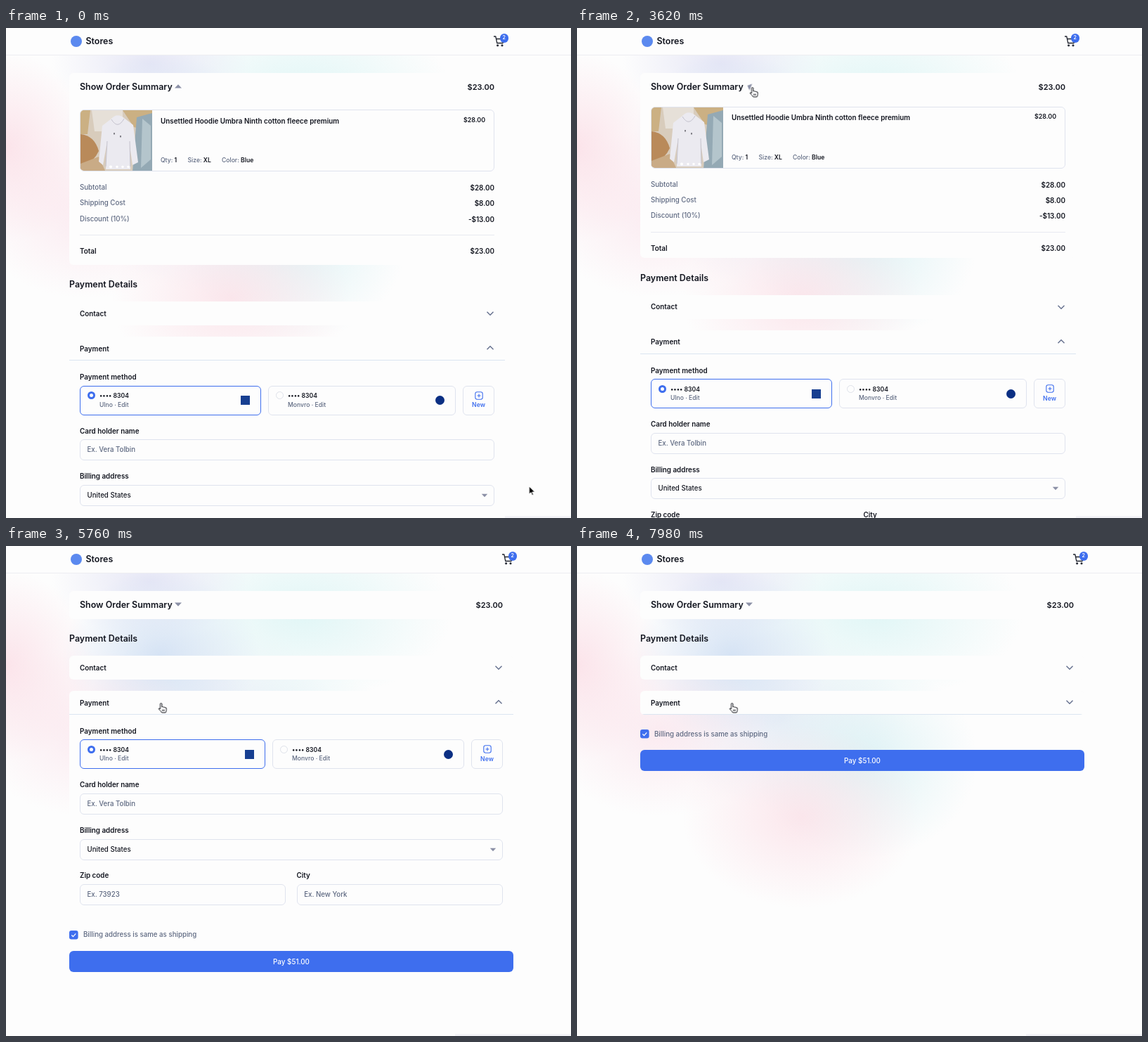
These frames come from a looping animation (804 px wide and 697 px high, 8000 ms). An HTML page:

```html
<!DOCTYPE html>
<html lang="en">
<head>
<meta charset="utf-8">
<title>Checkout</title>
<style>
:root { --paper: #fdfdfd; --ink: #12151f; --mute: #5d6880; --line: #dfe3ee; --blue: #3e6eee; }
* { box-sizing: border-box; }
html, body { margin: 0; width: 100%; height: 100%; overflow: hidden; }
body { position: relative; color: var(--ink); font: 600 9.85px/20px Inter, sans-serif; white-space: nowrap;
  background:
    linear-gradient(#f3f3f7, #f3f3f7) 100% 100% / 165px 3px no-repeat,
    radial-gradient(125px 135px at 0 170px, #fbdee6d0, #fbdee600),
    radial-gradient(160px 120px at 115px 265px, #fae0e9a0, #fae0e900),
    radial-gradient(170px 130px at 320px 385px, #fbe0e7c8, #fbe0e700),
    radial-gradient(140px 120px at 220px 155px, #cfdff3d8, #cfdff300),
    radial-gradient(140px 80px at 205px 50px, #dedff3c0, #dedff300),
    radial-gradient(210px 125px at 425px 95px, #d9f4f4c8, #d9f4f400),
    radial-gradient(160px 140px at 410px 305px, #d7f0f3c8, #d7f0f300),
    radial-gradient(180px 130px at 290px 245px, #dfe6f3b0, #dfe6f300),
    var(--paper); }
.t, .abs, .field, .tile, .mark, svg { position: absolute; }
.t { left: calc(var(--x) * 1px); top: calc(var(--y) * 1px - 10px); }
.t.r { left: auto; right: calc(var(--x) * 1px); }
.h { font-size: 12.45px; }
.s { font-size: 8.65px; }
.m { font-weight: 500; font-size: 9.7px; color: var(--mute); }
.s.m { font-size: 8.6px; }
.m b { color: var(--ink); font-weight: 600; }
.bar { position: absolute; left: 0; right: 0; top: 0; height: 39px; background: var(--paper); border-bottom: 1px solid #ededf1; }
#page { position: absolute; left: 90px; top: 0; width: 620px; padding-top: 64px; }
.card { position: relative; background: var(--paper); border-radius: 6px; overflow: hidden; }
.head { position: relative; height: 34px; }
.fold { overflow: hidden; padding: 12.8px 0; max-height: 400px; }
.inner { position: relative; }
.field, .tile { border: 1px solid var(--line); border-radius: 6px; }
.field { left: 15px; right: 15px; height: 30px; }
.half { right: auto; width: calc(50% - 22.75px); }
.tile { top: 22.7px; height: 42px; }
.dot { position: absolute; left: 10px; top: 7.5px; width: 11px; height: 11px; border: 1px solid #dde0e8; border-radius: 50%; }
.on { border: 3.5px solid var(--blue); }
.mark { width: 13px; height: 13px; }
.turn { width: 12px; height: 12px; }
.rule { position: absolute; left: 15px; right: 15px; height: 1px; background: #e8eaf1; }
svg { overflow: visible; fill: none; }
</style>
</head>
<body>
<div class="bar"></div>
<div id="page">
  <div class="mark" style="left:2px;top:11px;width:16px;height:16px;border-radius:50%;background:#5b89ef"></div>
  <span class="t h" style="--x:23.5;--y:19">Stores</span>
  <svg style="right:0;top:11px" width="16" height="16" stroke="#20242f" stroke-width="1.3" stroke-linejoin="round">
    <path d="M0 1H2.8L4.8 10.5H13L14.5 4.5H3.5"/><circle cx="5.6" cy="13.8" r=".9"/><circle cx="12" cy="13.8" r=".9"/></svg>
  <div class="abs" style="right:-5px;top:8px;width:12.5px;height:12.5px;border-radius:50%;background:var(--blue);color:#fff;font-size:7px;line-height:12.5px;text-align:center">2</div>

  <div class="card">
    <div class="head" style="height:39.5px">
      <span class="t h" style="--x:15;--y:20">Show Order Summary</span>
      <svg class="turn" id="triangle" style="left:149px;top:13px"><path fill="#8b90a6" d="M1 3.5H11L6 8.7Z"/></svg>
      <span class="t r" style="--x:15;--y:20;font-size:11px">$23.00</span>
    </div>
    <div class="fold" id="summary"><div class="inner" style="height:207.6px">
      <div class="field" style="top:0;height:88px;overflow:hidden">
        <svg width="102" height="88" style="left:0;top:0">
          <path fill="#d8ccbc" d="M0 0H102V88H0Z"/>
          <path fill="#cbb083" d="M0 0H14L10 34H0ZM60 0H102V30L76 24Z"/>
          <path fill="#e6e0d8" d="M16 0H60V30H20Z"/>
          <path fill="#b98a5a" d="M0 34Q20 36 26 58Q20 72 0 84Z"/>
          <path fill="#c9ab86" d="M0 76L26 66L36 88H0Z"/>
          <path fill="#94a9b4" d="M80 10L102 4V88H74Z"/>
          <path fill="#b4c5cc" d="M88 12L100 22V70L86 82Z"/>
          <path fill="#ebeaf0" d="M44 12Q52 3 62 11L75 21L82 74L74 78L70 50L71 84H36L37 50L32 78L26 73L31 22Z"/>
          <path stroke="#c3c1cc" d="M44 13Q53 28 62 12M38 44L36 80M70 44L71 80"/>
          <path stroke="#4a4a52" stroke-width="1.3" d="M48 32V34.5M57 36V38.5"/>
          <g fill="#fff"><circle cx="43" cy="80.5" r="2"/><circle cx="52" cy="80.5" r="1.7"/><circle cx="60" cy="80.5" r="1.7"/><circle cx="68" cy="80.5" r="1.7"/></g>
        </svg>
        <span class="t" style="--x:114;--y:14.5">Unsettled Hoodie Umbra Ninth cotton fleece premium</span>
        <span class="t r s" style="--x:12;--y:13.5;font-size:8.9px">$28.00</span>
        <span class="t s m" style="--x:114;--y:71">Qty: <b>1</b></span>
        <span class="t s m" style="--x:152.5;--y:71">Size: <b>XL</b></span>
        <span class="t s m" style="--x:201;--y:71">Color: <b>Blue</b></span>
      </div>
      <span class="t m" style="--x:15;--y:111">Subtotal</span><span class="t r" style="--x:15;--y:111">$28.00</span>
      <span class="t m" style="--x:15;--y:133">Shipping Cost</span><span class="t r" style="--x:15;--y:133">$8.00</span>
      <span class="t m" style="--x:15;--y:155.5">Discount (10%)</span><span class="t r" style="--x:15;--y:155.5">-$13.00</span>
      <div class="rule" style="top:178px"></div>
      <span class="t" style="--x:15;--y:201">Total</span><span class="t r" style="--x:15;--y:201">$23.00</span>
    </div></div>
  </div>

  <div class="head" style="height:52.5px"><span class="t h" style="--x:0;--y:28.5">Payment Details</span></div>

  <div class="card head">
    <span class="t" style="--x:15;--y:16.5">Contact</span>
    <svg class="turn" style="right:15px;top:11px"><path stroke="#67728f" stroke-width="1.4" d="M1.5 3.7L6 8.3L10.5 3.7"/></svg>
  </div>

  <div class="card" style="margin-top:16px">
    <div class="head" style="border-bottom:1px solid #dbe5f1">
      <span class="t" style="--x:15;--y:16.5">Payment</span>
      <svg class="turn" id="chevron" style="right:15px;top:10px"><path stroke="#67728f" stroke-width="1.4" d="M1.5 3.7L6 8.3L10.5 3.7"/></svg>
    </div>
    <div class="fold" id="payment"><div class="inner" style="height:260.4px">
      <span class="t" style="--x:15;--y:10.2">Payment method</span>
      <div class="tile" style="left:15px;width:calc(50% - 52px);border-color:var(--blue)">
        <div class="dot on"></div>
        <span class="t s" style="--x:27;--y:13.5">•••• 8304</span>
        <span class="t s m" style="--x:27;--y:26">Ulno · Edit</span>
        <div class="mark" style="right:15px;top:13.5px;background:#173f91"></div>
      </div>
      <div class="tile" style="left:calc(50% - 27px);right:70px">
        <div class="dot"></div>
        <span class="t s" style="--x:27;--y:13.5">•••• 8304</span>
        <span class="t s m" style="--x:27;--y:26">Monvro · Edit</span>
        <div class="mark" style="right:15.5px;top:13.5px;border-radius:50%;background:#0b2f83"></div>
      </div>
      <div class="tile" style="right:15px;width:45px;color:var(--blue);text-align:center">
        <svg width="12" height="12" style="left:16px;top:7px" stroke="#3e6eee" stroke-width="1.1"><rect x=".8" y=".8" width="10.4" height="10.4" rx="2.6"/><path d="M3.5 6H8.5M6 3.5V8.5"/></svg>
        <span class="abs s" style="left:0;right:0;top:16.5px">New</span>
      </div>
      <span class="t" style="--x:15;--y:86.7">Card holder name</span>
      <div class="field" style="top:99.5px"><span class="t m" style="--x:9.5;--y:14">Ex. Vera Tolbin</span></div>
      <span class="t" style="--x:15;--y:151.2">Billing address</span>
      <div class="field" style="top:164px"><span class="t m" style="--x:9.5;--y:14;color:var(--ink)">United States</span>
        <svg class="turn" style="right:7px;top:8px"><path fill="#8b90a6" d="M1.8 3.7H10.2L6 8.2Z"/></svg></div>
      <span class="t" style="--x:15;--y:215.7">Zip code</span>
      <div class="field half" style="top:228.5px"><span class="t m" style="--x:9.5;--y:14">Ex. 73923</span></div>
      <span class="t" style="left:calc(50% + 7.5px);--y:215.7">City</span>
      <div class="field half" style="top:228.5px;left:auto;right:15px"><span class="t m" style="--x:9.5;--y:14">Ex. New York</span></div>
    </div></div>
  </div>

  <div class="inner">
    <svg width="13" height="13" style="left:0;top:21px"><rect width="12.6" height="12.6" rx="3" fill="#3e6eee"/><path d="M3.4 6.5L5.5 8.6L9.3 4.4" stroke="#fff" stroke-width="1.3"/></svg>
    <span class="t m" style="--x:20;--y:27.5">Billing address is same as shipping</span>
    <div class="abs" style="left:0;right:0;top:50px;height:30px;border-radius:6px;background:var(--blue);color:#fff;font-weight:500;line-height:30px;text-align:center">Pay $51.00</div>
  </div>
</div>

<div class="abs" id="cursor" style="left:0;top:0">
  <svg id="arrow" width="9" height="14" style="left:0;top:0"><path fill="#000" stroke="#fff" stroke-width=".8" d="M0 0V11L2.6 8.6L4.3 12.6L6 11.9L4.3 8H7.8Z"/></svg>
  <svg id="hand" width="13" height="15" style="left:-4.2px;top:0"><path fill="#fff" stroke="#14161c" stroke-width="1" stroke-linejoin="round" d="M3 1.8a1.2 1.2 0 0 1 2.4 0V6q1.6-1 2.2.3 1.6-.7 2.1.5 1.9-.4 2 1.2V10.5Q11.6 12 10.6 14H5.2Q4 11.8 1 9.2 .4 7.8 2 7.9L3 8.8ZM6.3 9.5V12M8.4 9.5V12"/></svg>
</div>

<script>
const LOOP = 8000;

// Each step is [time, styles, easing towards the next step].
function play(id, steps) {
  const frames = steps.map(([time, styles, easing = 'linear']) => ({ offset: time / LOOP, easing, ...styles }));
  document.getElementById(id).animate(frames, { duration: LOOP, iterations: Infinity });
}

function change(id, from, to, start, end) {
  play(id, [[0, from], [start, from, 'ease'], [end, to], [LOOP, to]]);
}

function collapse(body, icon, start, end) {
  change(body, { maxHeight: '400px', paddingTop: '12.8px', paddingBottom: '12.8px' },
    { maxHeight: '0px', paddingTop: '0px', paddingBottom: '0px' }, start, end);
  change(icon, { transform: 'rotate(180deg)' }, { transform: 'rotate(0deg)' }, start, end);
}

collapse('summary', 'triangle', 3375, 4430);
collapse('payment', 'chevron', 6580, 7580);

// The content widens once the page no longer needs to scroll.
change('page', { width: '620px' }, { width: '632px' }, 3960, 3960);

const at = (x, y) => ({ transform: `translate(${x}px, ${y}px)` });
play('cursor', [
  [0, at(744.5, 652)], [120, at(744.5, 652), 'ease-in-out'],
  [790, at(249.5, 84)], [4330, at(249.5, 84), 'ease-in-out'],
  [4680, at(243.5, 113)], [5050, at(243.5, 113), 'ease-in-out'],
  [5750, at(220.5, 223)], [LOOP, at(220.5, 223)]
]);

const handFrom = [[0, 0], [700, 1], [4520, 0], [5380, 1], [5490, 0], [5570, 1], [LOOP, 1]];
const shown = invert => handFrom.map(([time, on]) => [time, { opacity: invert ? 1 - on : on }, 'steps(1)']);
play('hand', shown(false));
play('arrow', shown(true));
</script>
</body>
</html>
```
